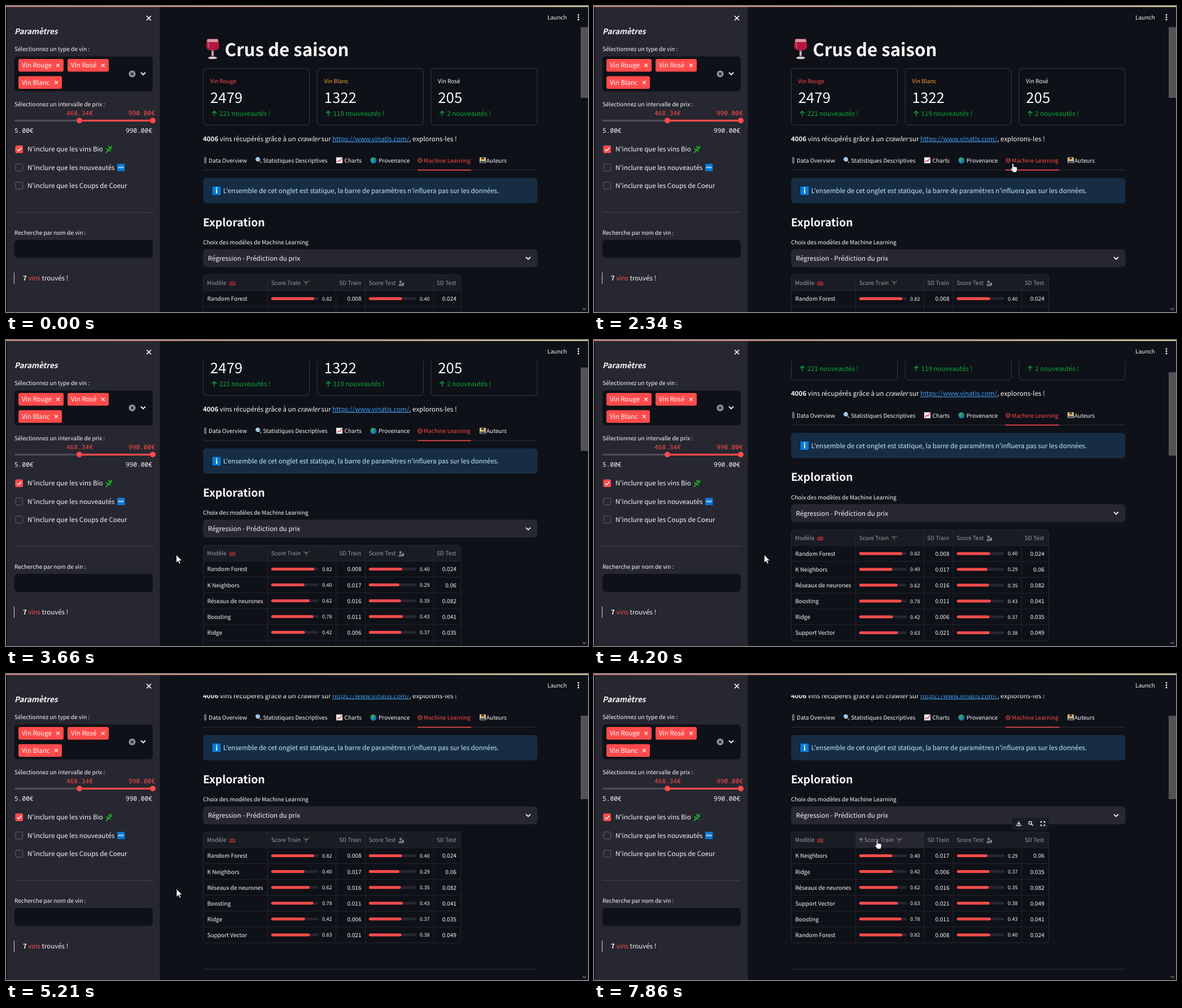
These frames come from a looping animation (1031x543 px, 8000 ms). An HTML page:

```html
<!DOCTYPE html>
<html lang="fr">
<head>
<meta charset="utf-8">
<title>Tableau de bord</title>
<style>
html, body { margin: 0; width: 100%; height: 100%; overflow: hidden; background: #0e1117; }
svg { display: block; width: 100vw; height: 100vh; }
text { font-family: "Noto Sans CJK JP", "Noto Sans CJK SC", "Noto Sans CJK", sans-serif; fill: #fafafa;
  white-space: pre; text-rendering: geometricPrecision; }
.mono { font-family: "Noto Sans Mono", "DejaVu Sans Mono", monospace; }
.b { font-weight: 700; }
.i { font-style: italic; }
.end { text-anchor: end; }
.red { fill: #ff4b4b; }
.green { fill: #09ab3b; }
.orange { fill: #f5a03c; }
.dim { fill: #9a9ca3; }
.link { fill: #3d9df3; text-decoration: underline; }
.info { fill: #c7ebff; }
</style>
</head>
<body>
<svg id="stage" viewBox="0 0 1031 543" preserveAspectRatio="none"></svg>
<script>
const RED = '#ff4b4b', BG = '#0e1117', PANEL = '#262730', WHITE = '#fafafa';
const BODY = 11.52, SMALL = 10.06;

const text = (x, y, size, str, cls = '') =>
  `<text x="${x}" y="${y}" font-size="${size}" class="${cls}">${str}</text>`;
const box = (x, y, w, h, fill, r = 0, extra = '') =>
  `<rect x="${x}" y="${y}" width="${w}" height="${h}" rx="${r}" fill="${fill}" ${extra}/>`;
const line = (d, color = WHITE, width = 1.5) =>
  `<path d="${d}" fill="none" stroke="${color}" stroke-width="${width}"/>`;
const shape = (d, fill, extra = '') => `<path d="${d}" fill="${fill}" ${extra}/>`;
const dot = (x, y, r, fill) => `<circle cx="${x}" cy="${y}" r="${r}" fill="${fill}"/>`;
const cross = (x, y, r, color, width) =>
  line(`M${x - r} ${y - r}l${2 * r} ${2 * r}m0 ${-2 * r}l${-2 * r} ${2 * r}`, color, width);
const chevron = (x, y) => line(`M${x - 4} ${y - 2}l4 4 4-4`, WHITE, 1.8);

function sidebar() {
  const tag = (x, y, w, str) => box(x, y, w, 22.5, RED, 3) +
    text(x + 6, y + 15.3, BODY, str) + cross(x + w - 10, y + 11.3, 2.8, '#fff', 1.3);
  const check = (y, str) => box(17, y - 6, 12.5, 12.5, 'none', 2, 'stroke="#64656e"') +
    text(38, y + 4.4, BODY, str);
  return box(0, 0, 272.5, 543, PANEL) + box(0, 0, 1.5, 543, '#0b0b10') +
    cross(253, 21.5, 4, WHITE, 1.6) +
    text(15, 50, 13.5, 'Paramètres', 'b i') +
    text(15, 80.3, SMALL, 'Sélectionnez un type de vin :') +
    box(15, 89.5, 245, 62, BG, 6) +
    tag(22, 94, 80, 'Vin Rouge') + tag(109, 94, 73, 'Vin Rosé') + tag(22, 124.5, 77, 'Vin Blanc') +
    dot(223.5, 120.5, 6, '#8f929b') + cross(223.5, 120.5, 2.2, BG, 1.3) + chevron(243, 120) +
    text(15, 178.3, SMALL, 'Sélectionnez un intervalle de prix :') +
    text(107, 193.8, 11.2, '468.34€', 'mono red') + text(217, 193.8, 11.2, '990.00€', 'mono red') +
    box(15, 201.7, 115, 3.2, '#4c4d56', 1.5) + box(130, 201.7, 130, 3.2, RED, 1.5) +
    dot(130, 203.3, 5, RED) + dot(260, 203.3, 5, RED) +
    text(15, 225.3, 11.2, '5.00€', 'mono') + text(212, 225.3, 11.2, '990.00€', 'mono') +
    check(254, "N'inclure que les vins Bio") +
    box(16.5, 247.5, 13.5, 13.5, RED, 2) + line('M19.8 254.5l2.6 2.6 4.8-5.4', '#fff', 1.7) +
    line('M177 261l10.5-12.5M180.500 256.500l-2.500-4M183.500 253l-1.500-5M180.500 256.500l5.500.5M183.500 253l5-.5', '#0c2b10', 4) +
    line('M177 261l10.5-12.5M180.500 256.500l-2.500-4M183.500 253l-1.500-5M180.500 256.500l5.500.5M183.500 253l5-.5', '#2f9a3c', 2.2) +
    check(286.3, "N'inclure que les nouveautés") +
    box(197, 280, 13.5, 13, '#0a78d6', 1) + text(198.6, 288.4, 4.4, 'NEW', 'b') +
    check(318.6, "N'inclure que les Coups de Coeur") +
    box(15, 365.7, 245, 1, '#46474f') +
    text(15, 406.3, SMALL, 'Recherche par nom de vin :') +
    box(15, 415, 245, 32, BG, 6) +
    box(14, 473, 1, 20, '#d5d5d8') +
    text(30, 487.3, BODY, '<tspan class="b">7</tspan> <tspan class="red">vins</tspan> trouvés !');
}

function header() {
  const strip = `<linearGradient id="strip"><stop stop-color="#f08c86"/>
    <stop offset=".5" stop-color="#f5bd96"/><stop offset="1" stop-color="#f9ecaa"/></linearGradient>`;
  return strip + box(0, 0, 1031, 1.6, 'url(#strip)') + text(959, 24.2, SMALL, 'Launch') +
    [15.8, 20, 24.2].map(y => dot(1014, y, 1.4, WHITE)).join('') +
    line('M1021.5 536l3 3 3-3', '#77787c', 1.3);
}

function card(x, label, cls, count, news) {
  return box(x + .5, 110.8, 188, 100.4, 'none', 6, 'stroke="#3a3c43"') +
    text(x + 12.6, 137, SMALL, label, cls) + text(x + 12.8, 171.6, 25.8, count) +
    line(`M${x + 20} 195.5v-9m-4 4l4-4 4 4`, '#09ab3b', 1.4) +
    text(x + 28.8, 195.2, BODY, news + ' nouveautés !', 'green');
}

function tabs() {
  const labels = [[359, 'Data Overview'], [455.2, 'Statistiques Descriptives'], [599.6, 'Charts'],
    [660, 'Provenance'], [740, 'Machine Learning', 'red'], [851, 'Auteurs']];
  return labels.map(([x, str, cls]) => text(x, 278, SMALL, str, cls)).join('') +
    box(351.5, 268.5, 3, 10.5, '#4e5058', 1, 'stroke="#a9abb0" stroke-width=".7"') +
    line('M448 274l4.5 4.5', '#8a6a55', 2) +
    `<circle cx="446" cy="272" r="3.4" fill="#8cc8f0" stroke="#d8dde2"/>` +
    box(585, 268.5, 11, 10.5, '#f1f1f1') + line('M586.5 277l3-3 2 1.5 3.5-5.5', '#e0303c', 1.3) +
    dot(650.8, 274, 5.5, '#1674c4') + shape('M647 270c3-2 6-1 6 1s-3 2-2 4-2 4-3 1-3-3-1-6z', '#3aa84a') +
    `<circle cx="733.5" cy="274" r="3.2" fill="none" stroke="${RED}"/>` +
    `<circle cx="733.5" cy="274" r="4.1" fill="none" stroke="${RED}" stroke-dasharray="1.2 1.4"/>` +
    dot(733.5, 274, .9, RED) +
    box(839, 268.5, 11, 10.5, '#d8cba8', 1) + dot(844.5, 272, 2.8, '#e8a93a') +
    shape('M841.5 272c0-5 6-5 6 0z', '#5b3a1e') + box(840, 275, 9, 4, '#4c5663') +
    box(349, 290.5, 592, 1, '#31333c') + box(729, 290.4, 95, 1.6, RED);
}

const ROW = 28.1, TOP = 477;
const rows = [
  ['Random Forest', '0.82', '0.008', '0.40', '0.024'],
  ['K Neighbors', '0.40', '0.017', '0.29', '0.06'],
  ['Réseaux de neurones', '0.62', '0.016', '0.35', '0.082'],
  ['Boosting', '0.78', '0.011', '0.43', '0.041'],
  ['Ridge', '0.42', '0.006', '0.37', '0.035'],
  ['Support Vector', '0.63', '0.021', '0.38', '0.049']];
const byName = [3, 1, 0, 2, 4, 5], byTrain = [1, 4, 2, 5, 3, 0], unsorted = [0, 1, 2, 3, 4, 5];

function table() {
  const bar = (x, v) => box(x, -2.8, 84, 5, PANEL, 2.5) + box(x, -2.8, 42 * (1 + +v), 5, RED, 2.5) +
    text(x + 107.8, 3.2, 9, v, 'end');
  const row = r => `<g class="row">${text(356.5, 3.7, SMALL, r[0])}${bar(469.8, r[1])}
    ${text(629.5, 3.7, SMALL, r[2], 'end')}${bar(642.8, r[3])}${text(797.8, 3.7, SMALL, r[4], 'end')}</g>`;
  const faded = icon => `<g opacity=".7">${icon}</g>`;
  const head = (id, x, str, icon) => `<path id="${id}Arrow" d="M${x + 3.3} 495v-7m-2.8 2.8l2.8-2.8 2.8 2.8"
    fill="none" stroke="#9a9ca3" stroke-width="1.1"/><g id="${id}">${text(x, 495, SMALL, str, 'dim')}${faded(icon)}</g>`;
  const grid = unsorted.map(i => `M349.5 ${TOP + ROW * (i + 1)}h456`).join('') +
    [463.5, 584.5, 636.5, 757.5].map(x => `M${x} ${TOP}v${ROW * 7}`).join('');
  const toolbox = box(395.5, 489.5, 11, 6.5, '#b8323a', 1) + line('M399 489.5v-1.5h4.500v1.500', '#7d2a30', 1) +
    box(395.5, 492, 11, 1, '#5a1a20');
  const lifter = line('M527 487.5l4.5 4.5v4m0-4l5.5-4.5', '#85766f', 1.5) + dot(531.8, 490, 1.3, '#a88a74');
  const figure = dot(699, 489.5, 2.3, '#9aa5a8') + shape('M695 497c0-6 8-6 8 0z', '#8d989b') +
    box(702, 491, 3, 5, '#b4bcbe');
  return box(349.5, TOP, 456, ROW, '#1a1c24', 4) + box(0, TOP, 1, ROW, '#262730', 0, 'id="hover"') +
    line(grid, '#23262e', 1) + box(349.5, TOP, 456, ROW * 7, 'none', 5, 'stroke="#25282f"') +
    head('name', 356, 'Modèle', toolbox) + head('train', 469.8, 'Score Train', lifter) +
    text(590.3, 495, SMALL, 'SD Train', 'dim') + text(642.5, 495, SMALL, 'Score Test', 'dim') + faded(figure) +
    text(763, 495, SMALL, 'SD Test', 'dim') + rows.map(row).join('');
}

function toolbar() {
  return `<g id="tools">` + box(741, 451.5, 64.5, 22, '#1a1c24', 5) +
    line('M752.5 458v5.5m-2.5-2.3l2.5 2.5 2.5-2.5m-6 2.5v2.2h7v-2.2', WHITE, 1.2) +
    `<circle cx="772.8" cy="461" r="2.6" fill="none" stroke="${WHITE}" stroke-width="1.3"/>` +
    line('M774.7 463l3 3', WHITE, 1.5) +
    line('M791.5 461v-2.3h2.3m2.4 0h2.3v2.3m0 2.4v2.3h-2.3m-2.4 0h-2.3v-2.3', WHITE, 1.3) + '</g>';
}

function page() {
  const glass = box(363.5, 78, 5, 13, '#c9a3b0', 0, 'stroke="#1b0a10"') +
    `<ellipse cx="366" cy="92" rx="8.5" ry="2.8" fill="#d6cdd2" stroke="#1b0a10"/>` +
    shape('M356.5 58h19c2 8 2.500 13 1.500 16-2 7-20 7-22 0-1-3-.5-8 1.500-16z', '#d994a6', 'stroke="#1b0a10"') +
    shape('M355.500 64h21c1 4 1 7 .5 9.500-2 6.500-20 6.500-22 0-.5-2.500-.5-5.500.5-9.500z', '#b3173c') +
    line('M359 65c-1 4-1 7 .5 9', '#e0627c', 1.5);
  return glass + text(387.5, 89.3, 31.2, 'Crus de saison', 'b') +
    card(349, 'Vin Rouge', 'red', '2479', '221') + card(550.8, 'Vin Blanc', 'orange', '1322', '119') +
    card(752.5, 'Vin Rosé', '', '205', '2') +
    text(349, 239.6, BODY, '<tspan class="b">4006</tspan> vins récupérés grâce à un ' +
      '<tspan class="i">crawler</tspan> sur <tspan class="link">https://www.vinatis.com/</tspan>, explorons-les !') +
    tabs() + box(349, 305, 592.5, 45, '#172d43', 6) +
    box(365, 319.5, 16, 16.5, '#0a78d6', 1, 'stroke="#06131f" stroke-width=".8"') +
    box(372.1, 325.8, 2, 6.8, '#fff') + dot(373.1, 323.4, 1.3, '#fff') +
    text(384.8, 331.9, BODY, "L'ensemble de cet onglet est statique, la barre de paramètres n'influera pas sur les données.", 'info') +
    text(349, 390.6, 19.3, 'Exploration', 'b') +
    text(349, 423, SMALL, 'Choix des modèles de Machine Learning') +
    box(349, 431.5, 592.5, 32, PANEL, 6) + text(357.8, 451.9, BODY, 'Régression - Prédiction du prix') +
    chevron(925, 447.5) + table() + toolbar() + box(349, 720, 592.5, 1, '#33353d');
}

const $ = id => document.getElementById(id);
$('stage').innerHTML = `<clipPath id="view"><rect x="272" y="37.5" width="759" height="506"/></clipPath>` +
  box(0, 0, 1031, 543, BG) +
  `<g clip-path="url(#view)"><g id="page">${page()}</g>${box(1018, 0, 13, 148, '#525357', 0, 'id="thumb"')}</g>` +
  sidebar() + header() + `<path id="cursor" fill="#fff" stroke="#000" stroke-width=".8"/>`;
const rowNodes = [...document.querySelectorAll('.row')];

const cursors = {
  arrow: 'M0 0V14.5l3.3-3.1 2.2 5 2.4-1-2.2-4.9h4.5z',
  hand: 'M-1.3 1c0-1.6 2.6-1.6 2.6 0v5c.4-1 2.2-1 2.4.2.5-.8 2-.6 2.1.4.6-.6 1.9-.3 1.9.8v3.5' +
    'c0 2-1.2 2.6-1.4 4.6h-6.2c-.4-2-3.3-4.2-4-6.2-.3-1.2 1.3-1.8 2.1-.6l.5.8z',
  beam: 'M-3.5-7.5h2.5l1 .6 1-.6h2.5v1.2H.7V6.300h2.8v1.2H1l-1-.6-1 .6h-2.5V6.300h2.8V-6.300h-2.8z'
};
// time, x, y of the pointer's hot spot
const path = [
  [190, 935, 545], [330, 760, 500], [500, 450, 410], [650, 320, 382], [1000, 320, 382],
  [1120, 440, 270], [1260, 660, 158], [1390, 824, 190], [1510, 758, 276], [1850, 758, 276],
  [2340, 743.5, 279], [2460, 560, 350], [2580, 304, 388], [2640, 320, 379], [2670, 320, 379],
  [2950, 301.5, 381], [5210, 301.5, 381], [5420, 400, 421], [5700, 470, 370], [5990, 517, 261],
  [6020, 517, 261], [6200, 440, 272], [6340, 364, 288], [6470, 396, 285], [6790, 397, 286],
  [6940, 397, 286], [7420, 499, 287], [7660, 500, 287], [7820, 500, 288], [7860, 501.5, 295], [8000, 501.5, 295]];

const clamp = v => Math.min(1, Math.max(0, v));
const inside = (v, a, b) => v >= a && v <= b;

function pointer(t) {
  const i = path.findIndex(p => p[0] > t);
  const [t0, x0, y0] = path[i - 1], [t1, x1, y1] = path[i];
  const p = (t - t0) / (t1 - t0);
  return [x0 + (x1 - x0) * p, y0 + (y1 - y0) * p];
}

function scrollAt(t) {
  return 112.7 * (1 - (1 - clamp((t - 3220) / 440)) ** 4) + 83 * clamp((t - 4005) / 590) + (t >= 4970);
}

const show = (id, on) => $(id).setAttribute('visibility', on ? 'visible' : 'hidden');
const move = (node, x, y) => node.setAttribute('transform', `translate(${x} ${y})`);

function draw(now) {
  const t = now % 8000, scroll = scrollAt(t);
  move($('page'), 0, -scroll);
  $('thumb').setAttribute('y', 15 + .3 * scroll);

  const sort = t >= 7820 ? 'train' : t >= 6940 ? 'name' : '';
  const order = sort === 'train' ? byTrain : sort ? byName : unsorted;
  order.forEach((r, i) => move(rowNodes[r], 0, TOP + ROW * (i + 1.5) + .3));
  for (const id of ['name', 'train']) {
    show(id + 'Arrow', sort === id);
    move($(id), sort === id ? 9 : 0, 0);
  }

  const visible = t >= 190;
  const [x, y] = visible ? pointer(t) : [0, 0], cy = y + scroll;
  const onTable = inside(x, 349, 805) && inside(cy, TOP, TOP + ROW * 7);
  const onHead = onTable && cy < TOP + ROW;
  const onTabs = inside(x, 349, 890) && inside(cy, 260, 291);
  const onSelect = inside(x, 349, 941) && inside(cy, 431, 464);
  show('tools', onTable);

  const edges = [349.5, 463.5, 584.5, 636.5, 757.5, 805.5];
  const col = edges.findIndex(e => e > x) - 1;
  show('hover', onHead && col >= 0);
  if (onHead && col >= 0) {
    $('hover').setAttribute('x', edges[col]);
    $('hover').setAttribute('width', edges[col + 1] - edges[col]);
  }

  show('cursor', visible);
  $('cursor').setAttribute('d', cursors[onHead || onTabs ? 'hand' : onSelect ? 'beam' : 'arrow']);
  move($('cursor'), x, y);
  requestAnimationFrame(draw);
}
requestAnimationFrame(draw);
</script>
</body>
</html>
```
